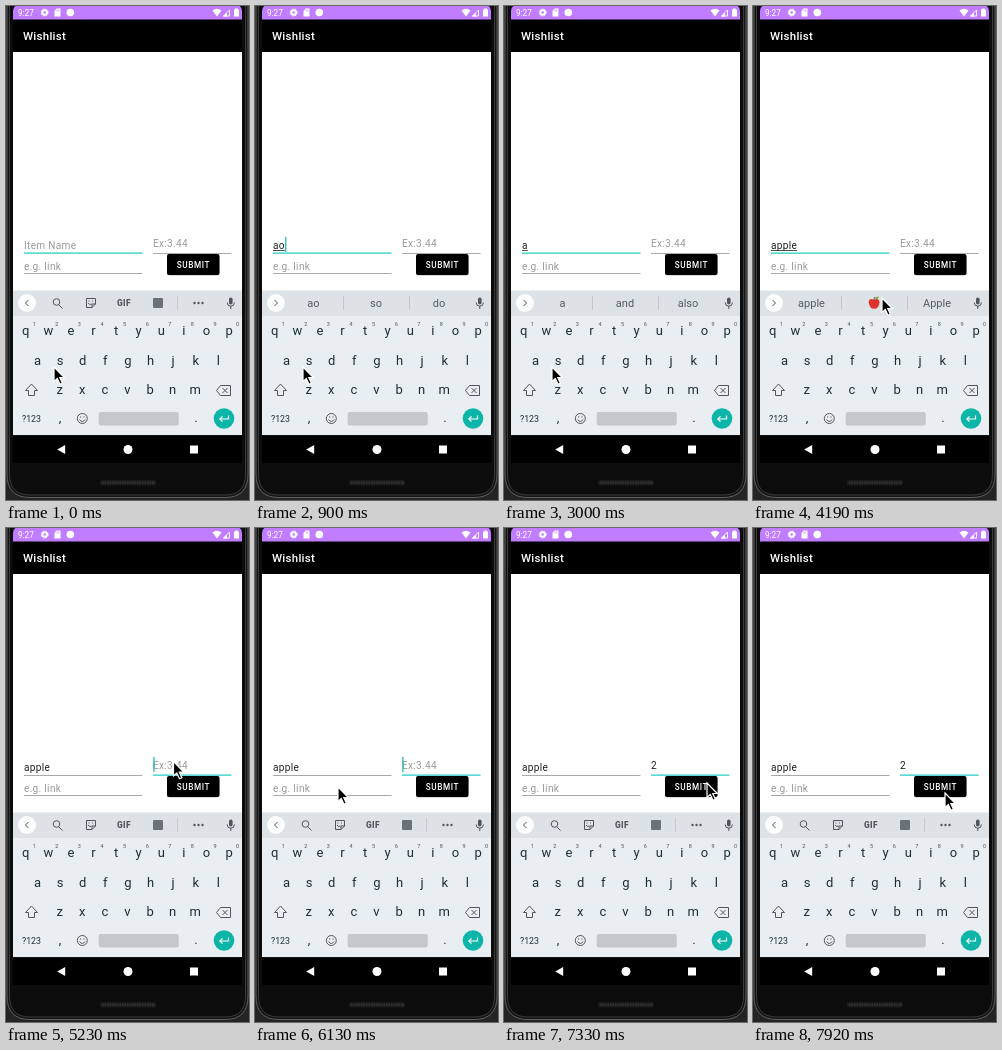
These frames come from a looping animation (243x494 px, 8 s). An HTML page:

```html
<!DOCTYPE html>
<html lang="en">
<head>
<meta charset="utf-8">
<title>Wishlist</title>
<style>
  html, body { margin: 0; width: 100%; height: 100%; overflow: hidden; background: #242424; }
  svg { display: block; width: 100vw; height: 100vh; font-family: Roboto, sans-serif; }
  .field { font-size: 10.1px; letter-spacing: .03em; fill: #222; }
  .hint { fill: #9a9a9a; }
  .mid { text-anchor: middle; }
  .line { fill: none; stroke: #50565b; stroke-width: 1; }
  #words { font-size: 11px; fill: #555c62; }
  #keys { font-size: 13px; fill: #1d3036; }
  #keys .digit { font-size: 5.5px; fill: #4c5358; }
</style>
</head>
<body>
<svg viewBox="0 0 243 494">
  <!-- phone body -->
  <path d="M1-5V468Q1 491.500 24 491.500H219Q242 491.500 242 468V-5" fill="#151515" stroke="#606060"/>
  <path d="M3.500-5V468Q3.500 489 24 489H219Q239.500 489 239.500 468V-5" fill="#0c0c0c" stroke="#3a3a3a"/>
  <rect x="94" y="474" width="56" height="5.500" rx="2.500" fill="#1c1c1c"/>
  <path d="M96 476.700H149" stroke="#363636" stroke-width="2" stroke-dasharray="1.500 1"/>

  <!-- status and title bars -->
  <path d="M7 13H236V47H7z"/>
  <path d="M7 13.500V5Q7 0 12-1H231Q236 0 236 5V13.500z" fill="#c17dff"/>
  <g fill="#fff">
    <text x="12" y="10" font-size="8.200">9:27</text>
    <circle cx="38.700" cy="6.500" r="2.300" fill="none" stroke="#fff" stroke-width="2"/>
    <circle cx="38.700" cy="6.500" r="3.500" fill="none" stroke="#fff" stroke-dasharray="1.400"/>
    <path d="M48.500 5L50.500 2.500H54.500V10.500H48.500z"/>
    <path d="M51 3.500v2M52.800 3.500v2" stroke="#c17dff" stroke-width=".7"/>
    <circle cx="64.300" cy="6.500" r="3.800"/>
    <path d="M206.500 4.500Q211 1 215.500 4.500L211 10.500z"/>
    <path d="M217.500 10L223.500 4V10z" fill="none" stroke="#fff" stroke-width=".9"/>
    <path d="M217 10.500L221 6.500V10.500z"/>
    <path d="M228 3.500H229.300V2.500H231.700V3.500H233V10.500H228z"/>
    <text x="17" y="34" font-size="11.500" font-weight="500" letter-spacing=".25">Wishlist</text>
  </g>

  <!-- form -->
  <path d="M7 46H236V285H7z" fill="#fff"/>
  <g class="field">
    <text id="item" x="18" y="243"/>
    <text id="price" x="147" y="241"/>
    <text class="hint" x="18" y="263.700">e.g. link</text>
  </g>
  <path id="composing" stroke="#222" stroke-width=".8"/>
  <path id="itemLine"/>
  <path id="priceLine"/>
  <path d="M18 267.500H136.500" stroke="#939393" stroke-width=".8"/>
  <rect id="caret" width="1.200" height="15" fill="#16b8b0"/>
  <rect x="161" y="249" width="52.500" height="20.600" rx="2.500" fill="#bbb"/>
  <rect x="161" y="248" width="52.500" height="21" rx="2" fill="#000"/>
  <text class="mid" x="187.500" y="262" font-size="8.200" font-weight="500" letter-spacing=".6" fill="#fff">SUBMIT</text>

  <!-- suggestion strip -->
  <path d="M7 284.500H236V310H7z" fill="#dce2e6"/>
  <circle cx="21" cy="297" r="9" fill="#fbfcfc"/>
  <path id="chevron" class="line"/>
  <g id="tools">
    <path class="line" d="M53 299L56.500 302.500"/>
    <circle class="line" cx="50.500" cy="296" r="3.300"/>
    <path class="line" d="M80.500 292.500H89.500V298L86 301.500H80.500zM86 301.500V298H89.500M82 297Q83.500 299.500 85.500 298M82.500 295h.9M86 295h.9"/>
    <text class="mid" x="118" y="300" font-size="8.300" font-weight="800" letter-spacing=".4" fill="#50565b">GIF</text>
    <rect x="147" y="292" width="10" height="10" rx="1" fill="#6b7277"/>
    <path d="M171.500 290V304" stroke="#c5cbd0"/>
    <g fill="#50565b"><circle cx="188.500" cy="297" r="1.200"/><circle cx="192.500" cy="297" r="1.200"/><circle cx="196.500" cy="297" r="1.200"/></g>
  </g>
  <g id="words" class="mid">
    <path d="M88.500 290V304M154.500 290V304" stroke="#c0c6cb"/>
    <text x="58.500" y="301"/><text x="121" y="301"/><text x="184" y="301"/>
    <g id="fruit">
      <path d="M121 294Q116 291 115.700 296.500Q117 303.500 121 302.500Q125.500 303.500 126.500 296.500Q126 291 121 294z" fill="#e0322d"/>
      <path d="M121 294.500Q121 292 122 291" stroke="#70402a" fill="none"/>
      <path d="M122 293Q122.500 290 126 290.500Q125 293.500 122 293z" fill="#63a52f"/>
    </g>
  </g>
  <rect x="223" y="291.500" width="3.600" height="7" rx="1.800" fill="#50565b"/>
  <path class="line" d="M221.200 296.500Q221.200 300.200 224.800 300.200T228.400 296.500M224.800 300V303"/>

  <!-- keyboard -->
  <path d="M7 310H236V429.300H7z" fill="#e8eef1"/>
  <g id="keys" class="mid">
    <text x="25.500" y="416" font-size="8.800">?123</text>
    <text x="54" y="416">,</text><text x="190" y="416">.</text>
  </g>
  <path class="line" d="M25.500 378L31.500 384.500H28.500V389.500H22.500V384.500H19.500z"/>
  <path class="line" d="M214.500 379.500H224.500V389.500H214.500L210.500 384.500zM216.500 382L221.500 387M221.500 382L216.500 387"/>
  <circle class="line" cx="76.300" cy="412.500" r="5"/>
  <path class="line" d="M73.500 413.500Q76.300 417.500 79.100 413.500M74 411h1.200M77.400 411h1.200"/>
  <rect x="92.700" y="406" width="80" height="13.500" rx="2" fill="#c2c8cb"/>
  <circle cx="218" cy="412.500" r="10.300" fill="#0bb6a8"/>
  <path d="M222.500 409.500V413H214M216.500 410.300L213.800 413L216.500 415.700" fill="none" stroke="#fff" stroke-width="1.200"/>

  <!-- navigation bar -->
  <path d="M7 429.300H236V457H7z"/>
  <g fill="#fff">
    <path d="M51.200 443.500L59.200 439V448z"/>
    <circle cx="122" cy="443.500" r="4.500"/>
    <path d="M184 439.500H192V447.500H184z"/>
  </g>

  <path id="mouse" d="M0 0V14.500L3.300 11.500L6 17.300L8.400 16.200L5.800 10.500H10.300z" stroke="#fff" stroke-width="1.200"/>
</svg>
<script>
const LOOP = 8000, FOCUS_PRICE = 5080, SHOW_TOOLS = 5230, TYPE_PRICE = 6430;
const $ = id => document.getElementById(id);

// Each track lists [start time, value]; a value holds until the next one.
const typing = [[0, ''], [750, 'a'], [900, 'ao'], [1050, 'aoo'], [1200, 'aoole'], [1950, 'aool'],
  [2100, 'aoo'], [2250, 'ao'], [2550, 'a'], [3300, 'app'], [3600, 'apple']];
const blink = [[0, 0], [300, 1], [1650, 0], [1950, 1], [3000, 0], [3300, 1], [4190, 0], [4630, 1],
  [5680, 0], [6130, 1], [6880, 0], [7470, 1], [7920, 0]];
const pointer = [[0, [48, 361]], [4190, [129, 292]], [4340, [169, 262]], [4490, [194, 241]],
  [4630, [181, 230]], [4780, [167.5, 233.5]], [5980, [131, 246]], [6130, [83, 259]], [6280, [67, 264]],
  [6430, [119, 266]], [6580, [171, 260]], [6880, [175, 253]], [7030, [183, 251]], [7180, [195, 252]],
  [7320, [203, 255]], [7470, [201, 257]], [7620, [195, 258]], [7920, [192, 265]]];
const suggestions = {
  a: ['a', 'and', 'also'], ao: ['ao', 'so', 'do'], aoo: ['aoo', 'too', 'zoo'],
  aool: ['aool', 'cool', 'tool'], aoole: ['aoole', 'Poole', 'cooler'],
  app: ['app', 'apps', 'approach'], apple: ['apple', '', 'Apple']
};
const at = (track, t) => track.findLast(([start]) => start <= t)[1];

function addKey(x, y, label, className = '') {
  $('keys').insertAdjacentHTML('beforeend', `<text x="${x}" y="${y}" class="${className}">${label}</text>`);
}
[['qwertyuiop', 19.7, 329], ['asdfghjkl', 31.5, 358.5], ['zxcvbnm', 53.7, 388]].forEach(([row, x, y], r) =>
  [...row].forEach((letter, i) => {
    addKey(x + 22.6 * i, y, letter);
    if (!r) addKey(x + 22.6 * i + 8.5, 320, (i + 1) % 10, 'digit');
  }));

const show = (id, on) => $(id).setAttribute('visibility', on ? 'visible' : 'hidden');

function setField(id, value, hint) {
  $(id).textContent = value || hint;
  $(id).setAttribute('class', value ? '' : 'hint');
  return value ? $(id).getComputedTextLength() : 0;
}

function setLine(id, left, right, focused) {
  $(id).setAttribute('d', `M${left} ${focused ? 247.2 : 247.5}H${right}`);
  $(id).setAttribute('stroke', focused ? '#22cfc6' : '#939393');
  $(id).setAttribute('stroke-width', focused ? 1.2 : .8);
}

function draw(t) {
  const item = at(typing, t), onPrice = t >= FOCUS_PRICE;
  const itemWidth = setField('item', item, 'Item Name');
  const priceWidth = setField('price', t >= TYPE_PRICE ? '2' : '', 'Ex:3.44');
  setLine('itemLine', 18, 136.5, !onPrice);
  setLine('priceLine', 147, 225.5, onPrice);
  $('composing').setAttribute('d', `M18 244.500h${onPrice ? 0 : itemWidth}`);
  $('caret').setAttribute('x', onPrice ? 147.3 + priceWidth : 18.3 + itemWidth);
  $('caret').setAttribute('y', onPrice ? 229 : 231);
  show('caret', at(blink, t));

  const suggesting = item !== '' && t < SHOW_TOOLS;
  show('words', suggesting);
  show('tools', !suggesting);
  show('fruit', suggesting && item === 'apple');
  $('chevron').setAttribute('d', suggesting ? 'M19.500 294L22.500 297L19.500 300' : 'M22.500 294L19.500 297L22.500 300');
  document.querySelectorAll('#words text').forEach((el, i) =>
    el.textContent = suggesting ? suggestions[item][i] : '');

  $('mouse').setAttribute('transform', `translate(${at(pointer, t)})`);
}

const begin = performance.now();
function tick() {
  draw((performance.now() - begin) % LOOP);
  requestAnimationFrame(tick);
}
tick();
</script>
</body>
</html>
```
